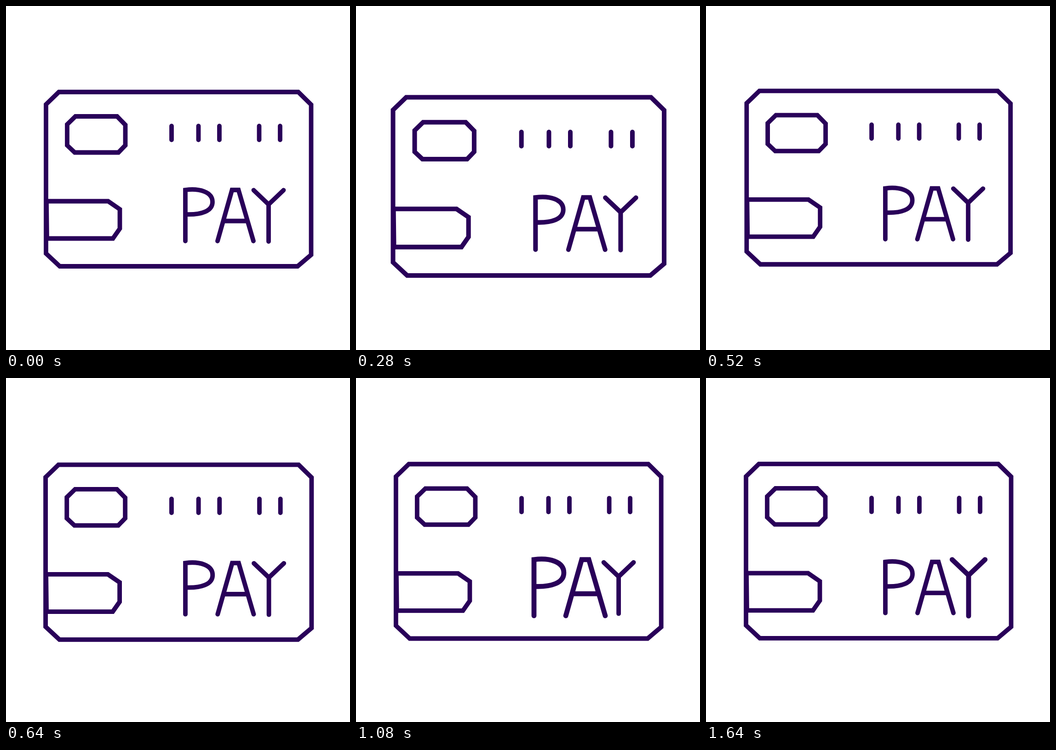
Write an HTML page that moves like this. It is 748 by 748 pixels and loops after 1840 ms.

```html
<!DOCTYPE html>
<html lang="en">
<head>
<meta charset="utf-8">
<title>Pay card</title>
<style>
  html, body { margin: 0; width: 100%; height: 100%; overflow: hidden; background: #fff; }
  svg { display: block; width: 100%; height: 100%; }
  #card { fill: none; stroke: #290059; stroke-width: 9.8; stroke-linecap: round; stroke-miterlimit: 10; }
</style>
</head>
<body>
<svg viewBox="0 0 748 748">
  <g id="card">
    <path d="M115 187H635.5L663.5 214.5V541L634 566H117L87 538V214Z"/>
    <path d="M151 240H241.5L259.5 258.5V303L244.5 318.5H149.5L133 303V257.5Z"/>
    <path d="M88 424.5H222L247.5 442V484L232.5 505.5H89Z"/>
    <path d="M360 261V291M418.5 261V291M464 261V291M550.5 261V291M596 261V291"/>
    <path id="p" d="M390 511V400C420 396 449 404 449 426C449 446 425 454.5 390 453"/>
    <path id="a" d="M460 511L491.5 400H505.5L538 511M473 467.5H525"/>
    <path id="y" d="M538.5 400.5L571 431.5L603.5 400.5M571 431.5V512"/>
  </g>
</svg>
<script>
  const LOOP = 1840, STEP = 40;
  const PEAK = 240, LAND = 480;
  const DROP = 16, GROW = 0.023;

  const $ = id => document.getElementById(id);
  const card = $('card');
  const letters = [
    { el: $('p'), on: 880, off: 1440, cx: 420, cy: 456 },
    { el: $('a'), on: 1080, off: 1640, cx: 499, cy: 456 },
    { el: $('y'), on: 1280, off: LOOP, cx: 571, cy: 457 }
  ];

  const ease = p => {
    const a = p ** 2.4, b = (1 - p) ** 2.4;
    return a / (a + b);
  };

  // Press down, release, then a damped wobble
  function press(t) {
    if (t < PEAK) return ease(t / PEAK);
    if (t < LAND) return 1 - ease((t - PEAK) / (LAND - PEAK));
    const s = (t - LAND) / 1000;
    return -0.27 * Math.sin(2 * Math.PI * 4.5 * s) * Math.exp(-4 * s);
  }

  const scaleAt = (cx, cy, k, dy = 0) =>
    `translate(${cx} ${cy + dy}) scale(${k}) translate(${-cx} ${-cy})`;

  function draw(t) {
    const v = press(t);
    card.setAttribute('transform', scaleAt(374, 374, 1 + GROW * v, DROP * v));
    for (const { el, on, off, cx, cy } of letters) {
      el.setAttribute('transform', scaleAt(cx, cy, t >= on && t < off ? 1.1 : 1));
    }
  }

  const start = performance.now();
  function tick() {
    const t = (performance.now() - start) % LOOP;
    draw(Math.floor(t / STEP) * STEP);
    requestAnimationFrame(tick);
  }
  tick();
</script>
</body>
</html>
```
